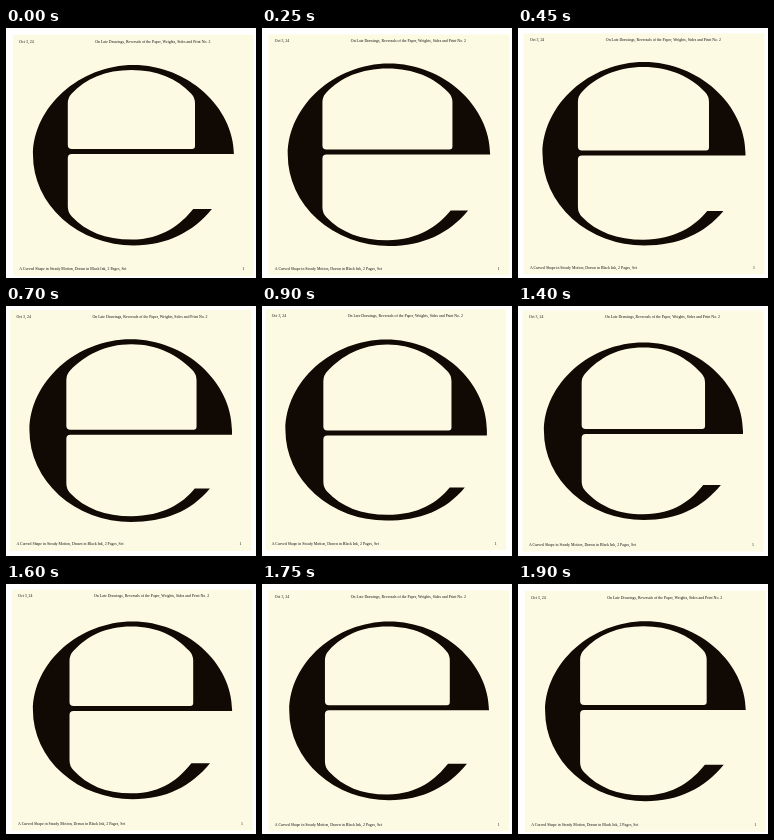
These frames come from a looping animation (250 by 250 pixels, 1.95 s). An HTML page:

```html
<!DOCTYPE html>
<html lang="en">
<head>
<meta charset="utf-8">
<title>Breathing letter</title>
<style>
html, body { margin: 0; width: 100%; height: 100%; overflow: hidden; background: #fff; }
svg { display: block; width: 100vw; height: 100vh; }
text { font: 3.9px "Liberation Serif", serif; fill: #111; }
</style>
</head>
<body>
<svg viewBox="0 0 250 250">
  <g id="page">
    <rect x="5" y="5" width="241" height="241" fill="#fdfae3"/>
    <text x="11.5" y="12.8">Oct 3, 24</text>
    <text x="145" y="12.8" text-anchor="middle">On Late Drawings, Reversals of the Paper, Weights, Sides and Print No. 2</text>
    <text x="11.5" y="240.4">A Curved Shape in Steady Motion, Drawn in Black Ink, 2 Pages, Set</text>
    <text x="234.5" y="240.4">1</text>
  </g>
  <path id="letter" fill="#110a04" fill-rule="evenodd"/>
</svg>
<script>
const LOOP = 1950, STEP = 50;
const page = document.getElementById('page');
const letter = document.getElementById('letter');

function outline(c, s) {
  // outer bowl
  const cx = 125.8 + 1.7 * c, cy = 125.6 + 1.6 * c;
  const rx = 100.5 + s, ry = 90.2 + 1.5 * s;
  const left = cx - rx, right = cx + rx, crown = cy - ry, bottom = cy + ry;
  const kx = rx * 0.535, ky = ry * 0.535;
  // counters and crossbar
  const l = 61.8 - 1.9 * s, r = 189 + 2 * s, mid = (l + r) / 2;
  const top = crown + 5, base = bottom - 5.8;
  const bar = 125.2 - 1.8 * c, barTop = bar - 2.5, barEnd = bar + 2.5;
  const shoulder = 75.5 - 1.5 * s, hip = base - 33;
  // terminal
  const ty = 181 + 2 * s, tx = 204.2 + 1.7 * c + s, ti = r - 1.8;

  return `M${right} ${barEnd}V${cy}
    C${right} ${cy - ky} ${cx + kx} ${crown} ${cx} ${crown}
    C${cx - kx} ${crown} ${left} ${cy - ky} ${left} ${cy}
    A${rx} ${ry} 0 0 0 ${cx} ${bottom}
    C${cx + 34} ${bottom} ${tx - 19} ${ty + 23} ${tx} ${ty}
    H${ti}
    C${ti - 12} ${ty + 15} ${mid + 31} ${base} ${mid} ${base}
    C${mid - 26} ${base} ${l + 18} ${hip + 25} ${l + 4} ${hip + 10}
    Q${l} ${hip + 6} ${l} ${hip}
    V${barEnd + 4}Q${l} ${barEnd} ${l + 4} ${barEnd}Z
    M${l} ${shoulder}
    Q${l} ${shoulder - 6} ${l + 4} ${shoulder - 10}
    C${l + 18} ${shoulder - 25} ${mid - 26} ${top} ${mid} ${top}
    C${mid + 26} ${top} ${r - 18} ${shoulder - 25} ${r - 4} ${shoulder - 10}
    Q${r} ${shoulder - 6} ${r} ${shoulder}
    V${barTop - 3}Q${r} ${barTop} ${r - 3} ${barTop}
    H${l + 4}Q${l} ${barTop} ${l} ${barTop - 4}Z`;
}

function draw(now) {
  const time = Math.floor(now / STEP) * STEP % LOOP;
  const angle = time / LOOP * 2 * Math.PI;
  const drift = 1.8 * Math.cos(angle - 0.1);
  page.setAttribute('transform', `translate(${drift} ${drift})`);
  letter.setAttribute('d', outline(Math.cos(angle), Math.sin(angle)));
  requestAnimationFrame(draw);
}
draw(performance.now());
</script>
</body>
</html>
```
